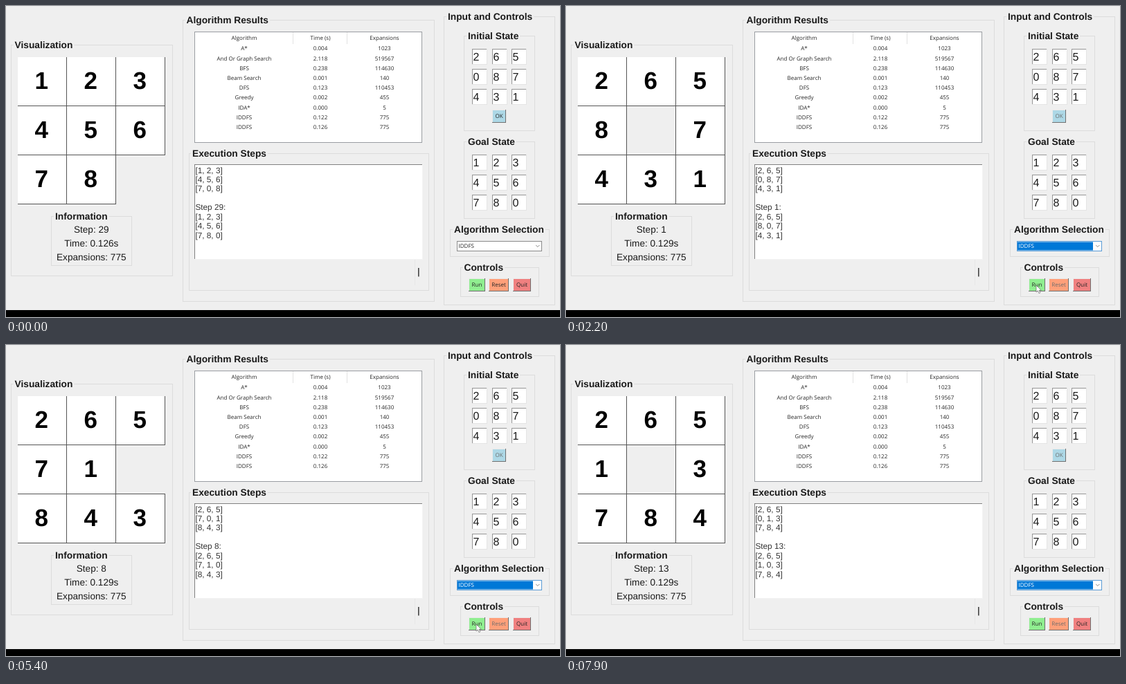
Recreate the animation shown at these times as an HTML page. Size 800 by 450 pixels, loop 8 s.

```html
<!DOCTYPE html>
<html lang="en">
<head>
<meta charset="utf-8">
<title>8-puzzle solver</title>
<style>
html, body { margin: 0; width: 100%; height: 100%; overflow: hidden; background: #efefef; }
svg { display: block; width: 800px; height: 450px; font-family: "Liberation Sans", Arial, sans-serif; fill: #1a1a1a; }
text { white-space: pre; text-rendering: geometricPrecision; }
.title { font-size: 13.75px; font-weight: bold; }
.info { font-size: 13.6px; text-anchor: middle; }
.tile { font-size: 35px; font-weight: bold; text-anchor: middle; fill: #000; }
.entry { font-size: 16px; }
.log { font-size: 11.8px; fill: #333; }
.ui { font-family: "Open Sans", "Noto Sans", sans-serif; font-size: 8px; fill: #262626; }
.mid { text-anchor: middle; }
</style>
</head>
<body>
<svg id="stage" viewBox="0 0 800 450" xmlns="http://www.w3.org/2000/svg">
  <defs><clipPath id="board"><rect x="17" y="74" width="213" height="213"/></clipPath></defs>
</svg>
<script>
const LOOP = 8000, START = 1205, STEP = 513;
const BG = '#efefef';
const stage = document.getElementById('stage');

function add(parent, tag, attrs, content) {
  const el = document.createElementNS('http://www.w3.org/2000/svg', tag);
  for (const key in attrs) el.setAttribute(key, attrs[key]);
  if (content !== undefined) el.textContent = content;
  parent.appendChild(el);
  return el;
}
const group = () => add(stage, 'g', {});
const rect = (x, y, width, height, fill, parent = stage) =>
  add(parent, 'rect', { x, y, width, height, fill });
const label = (x, y, cls, content, parent = stage) =>
  add(parent, 'text', { x, y, class: cls }, content);
const outline = (x, y, width, height, stroke, fill = 'none', parent = stage) =>
  add(parent, 'rect', { x: x + .5, y: y + .5, width, height, stroke, fill });

function bevel(x, y, w, h, fill, light, dark) {
  rect(x, y, w, h, dark);
  rect(x, y, w - 1, h - 1, light);
  rect(x + 1, y + 1, w - 2, h - 2, fill);
}

function panel(x, y, right, bottom, titleX, title) {
  outline(x, y, right - x, bottom - y, '#dcdcdc');
  const text = label(titleX, y + 5.4, 'title', title);
  const patch = rect(titleX - 2, y - 3, text.getComputedTextLength() + 4, 7, BG);
  stage.insertBefore(patch, text);
}

function entries(top, state) {
  [...state].forEach((digit, i) => {
    const x = Math.round(673 + (i % 3) * 28.5), y = top + Math.floor(i / 3) * 29;
    bevel(x, y, 22, 23, '#fff', '#969696', '#e4e4e4');
    label(x + 1.5, y + 17, 'entry', digit);
  });
}

function button(x, y, w, fill, name) {
  bevel(x, y, w, 19, fill, '#eaeaea', '#707070');
  return label(x + w / 2, y + 12, 'ui mid', name);
}

panel(7, 56, 240, 390, 12.5, 'Visualization');
panel(65, 304, 181, 375, 71, 'Information');
panel(255, 20, 618, 427, 260.5, 'Algorithm Results');
panel(264, 213, 610, 411, 269, 'Execution Steps');
panel(632, 15, 792, 432, 638, 'Input and Controls');
panel(661, 43, 763, 180, 667, 'Initial State');
panel(661, 196, 763, 307, 667, 'Goal State');
panel(641, 323, 784, 362, 647, 'Algorithm Selection');
panel(656, 378, 769, 420, 661.5, 'Controls');

// Results table
outline(272, 37, 328, 160, '#9a9da2', '#fff');
rect(414, 38, 1, 17, '#e2e2e2');
rect(492, 38, 1, 17, '#e2e2e2');
const row = (y, cells) => cells.forEach((c, i) => label([344, 454, 546.5][i], y, 'ui mid', c));
row(48.7, ['Algorithm', 'Time (s)', 'Expansions']);
[
  ['A*', '0.004', '1023'],
  ['And Or Graph Search', '2.118', '519567'],
  ['BFS', '0.238', '114630'],
  ['Beam Search', '0.001', '140'],
  ['DFS', '0.123', '110453'],
  ['Greedy', '0.002', '455'],
  ['IDA*', '0.000', '5'],
  ['IDDFS', '0.122', '775'],
  ['IDDFS', '0.126', '775']
].forEach((cells, i) => row(64.4 + i * 14.2, cells));

// Log and scrollbar
bevel(272, 229, 330, 138, '#fff', '#808080', '#f4f4f4');
rect(590, 367, 1, 37, '#e6e6e6');
const thumb = rect(595, 379, 1.6, 12.5, '#444');
const arrows = add(stage, 'path', { d: 'M592.8 376 L595.8 371 L598.8 376Z M592.8 395.5 L595.8 400.5 L598.8 395.5Z', fill: '#a0a0a0' });

entries(62, '265087431');
entries(215, '123456780');

const ok = button(702, 150, 20, '#add8e6', 'OK');
button(668, 394, 24, '#90ee90', 'Run');
const reset = button(697, 394, 29, '#ffa07a', 'Reset');
button(732, 394, 26, '#f08080', 'Quit');

// Algorithm selector
const selector = outline(651, 340, 122, 14, '#8a8a8a', '#fff');
const highlight = rect(652, 341.5, 109, 12, '#0078d7');
const choice = label(653.5, 350.2, 'ui', 'IDDFS');
add(stage, 'path', { d: 'M765.2 346 l2.6 2.6 l2.6 -2.6', fill: 'none', stroke: '#777', 'stroke-width': .9 });

const tiles = group(), info = group(), log = group();
tiles.setAttribute('clip-path', 'url(#board)');
const cursor = add(stage, 'path', {
  d: 'M0 0 V10 L2.3 8 L4 11.8 L5.8 11 L4.2 7.3 H7.2 Z',
  fill: '#fff', stroke: '#555', 'stroke-width': .6
});
rect(0, 440, 800, 10, '#000');

// Boards follow from the blank's moves
const MOVES = { U: -3, D: 3, L: -1, R: 1 };
function walk(start, path) {
  const boards = [start];
  for (const move of path) {
    const next = [...boards[boards.length - 1]];
    const from = next.indexOf('0'), to = from + MOVES[move];
    [next[from], next[to]] = [next[to], '0'];
    boards.push(next.join(''));
  }
  return boards;
}
const boards = walk('265087431', 'RRDLLURRDLLUR');

const lines = board => [0, 3, 6].map(i => `[${[...board.slice(i, i + 3)].join(', ')}]`);

function draw(step, time, board, previous) {
  for (const g of [tiles, info, log]) g.replaceChildren();
  [...board].forEach((digit, i) => {
    if (digit === '0') return;
    const x = 16 + (i % 3) * 71, y = 73 + Math.floor(i / 3) * 71;
    outline(x, y, 71, 71, '#555', '#fff', tiles);
    label(x + 35.3, y + 47.2, 'tile', digit, tiles);
  });
  [`Step: ${step}`, `Time: ${time}s`, 'Expansions: 775']
    .forEach((s, i) => label(123.3, 328.4 + i * 20, 'info', s, info));
  const before = previous ? [...lines(previous), ''] : [];
  [...before, `Step ${step}:`, ...lines(board)]
    .forEach((s, i) => label(273.4, 241.6 + i * 13.43, 'log', s, log));
}

function setRunning(on) {
  highlight.style.display = on ? '' : 'none';
  selector.style.stroke = on ? '#5a9bd5' : '';
  choice.style.fill = on ? '#fff' : '';
  ok.style.fill = reset.style.fill = on ? '#6d6d6d' : '';
}

// Pointer: [time, x, y]
const PATH = [[850, 775, 442], [1130, 679, 404], [5750, 679, 404], [6100, 800, 442]];
function movePointer(t) {
  const i = PATH.findIndex(p => t < p[0]);
  cursor.style.display = i > 0 ? '' : 'none';
  if (i < 1) return;
  const [a, b] = [PATH[i - 1], PATH[i]];
  const k = (t - a[0]) / (b[0] - a[0]), e = k * k * (3 - 2 * k);
  cursor.setAttribute('transform', `translate(${a[1] + (b[1] - a[1]) * e} ${a[2] + (b[2] - a[2]) * e})`);
}

let shown;
function render(t) {
  const step = Math.max(-1, Math.floor((t - START) / STEP));
  if (step !== shown) {
    shown = step;
    if (step < 0) draw(29, '0.126', '123456780', '123456708');
    else draw(step, '0.129', boards[step], boards[step - 1]);
    setRunning(step >= 0);
    thumb.style.display = step === 0 ? 'none' : '';
    arrows.style.display = step === 0 ? '' : 'none';
  }
  movePointer(t);
}

const origin = performance.now();
function tick() {
  render((performance.now() - origin) % LOOP);
  requestAnimationFrame(tick);
}
tick();
</script>
</body>
</html>
```
